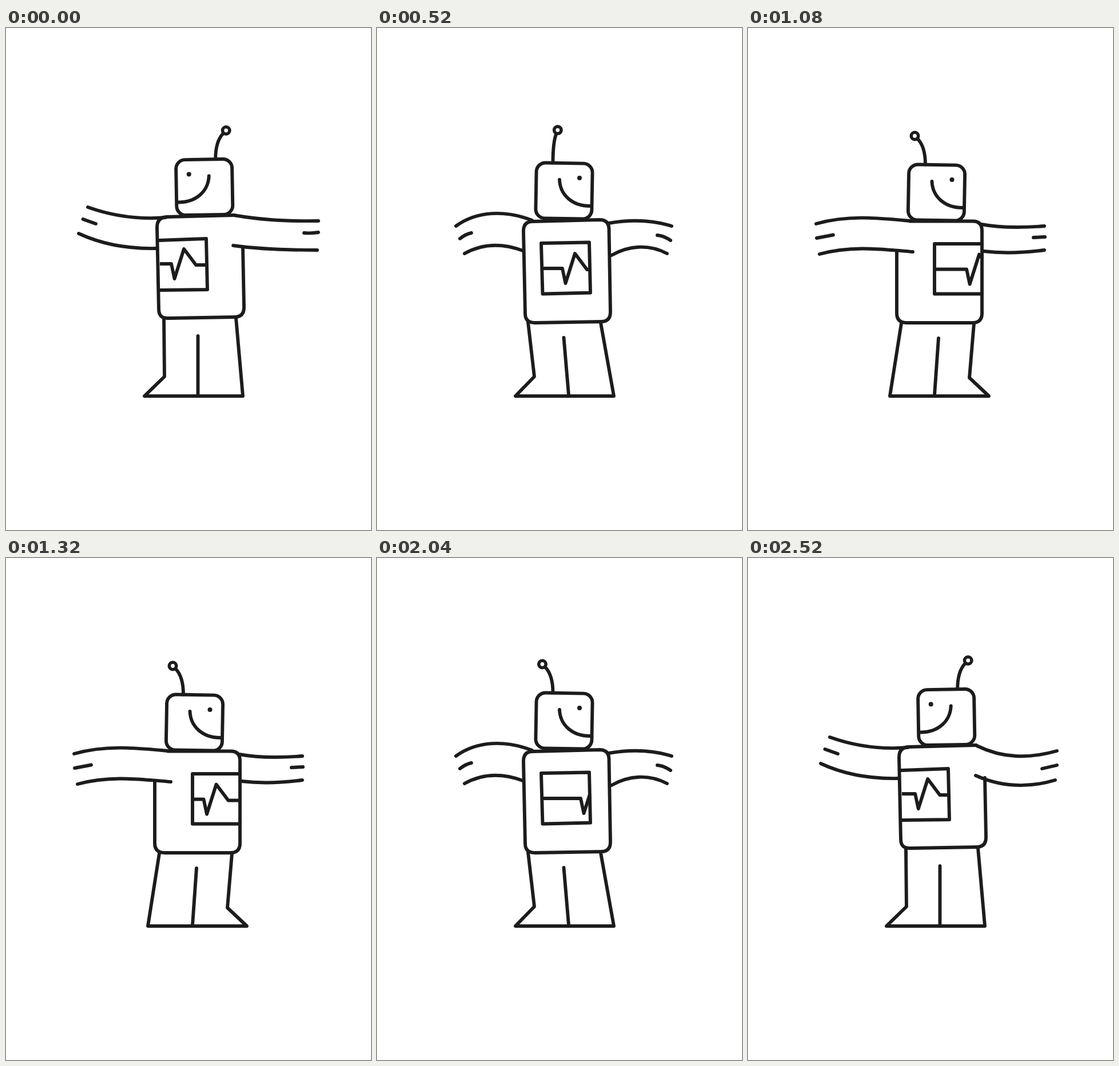
Recreate the animation shown at these times as an HTML page. Size 638 px wide and 877 px high, loop 2560 ms.

```html
<!DOCTYPE html>
<html lang="en">
<head>
<meta charset="utf-8">
<title>Dancing robot</title>
<style>
html, body { margin: 0; width: 100%; height: 100%; overflow: hidden; background: #fff; }
svg { display: block; width: 100%; height: 100%; }
.ink { fill: none; stroke: #1c1c1c; stroke-width: 5.9; stroke-linecap: round; stroke-linejoin: round; }
</style>
</head>
<body>
<svg viewBox="0 0 638 877">
  <defs><clipPath id="window"><rect id="pane" y="340" height="160"/></clipPath></defs>
  <g class="ink">
    <path id="legs"/>
    <path id="body"/>
    <path id="arms"/>
    <path id="panel"/>
    <path id="pulse" clip-path="url(#window)"/>
    <g id="head">
      <rect x="-49" y="-48.5" width="98" height="97" rx="16" transform="rotate(1)"/>
      <path d="M-8 -19.5C-7 6 13 27 47 26.5"/>
      <circle cx="27" cy="-22.5" r="4" fill="#1c1c1c" stroke="none"/>
    </g>
    <path id="stalk"/>
    <circle id="tip" r="6.2" stroke-width="5.6"/>
  </g>
</svg>
<script>
const LOOP = 2560, STEP = 40;
const el = id => document.getElementById(id);
const set = (id, attrs) => {
  for (const k in attrs) el(id).setAttribute(k, attrs[k]);
};

// Views of the torso, legs and head
const left = {
  head: [346.7, 278], face: -1, screen: [269, 412, 82],
  body: 'M414 384L416 488Q416 505 399 505L284 507Q267 508 267 491L264 348Q264 331 281 330L399 327',
  legs: 'M276 509L277 609L242 643H414L402 507M335.5 538V641',
  panel: 'M268 371L350 368L352 457L268 458'
};
const front = {
  head: [327, 284.5], face: 1, screen: [288, 420, 84],
  body: 'M272 338L389 335Q405 335 405.500 351L408 496Q408 513 392 513L276 515Q259 515 259 499L256 355Q256 338 272 338',
  legs: 'M264 514L275 609L242 643H414L391 515M326.500 541L335 641',
  panel: 'M287 376L371 374.500L373 462.500L289.500 464.500Z'
};
const right = {
  head: [328, 285.5], face: 1, screen: [324, 420.5, 83],
  body: 'M258 394L258 495Q258 512 275 512.500L391 513Q407 513 407 496V352Q407 335.500 391 335.500H272',
  legs: 'M266 513L252 643H409L389.500 611L393 513M332.500 541L330 641',
  panel: 'M407 375H324V462.500H407'
};
const farRight = {
  head: [329.5, 287.5], face: 1, screen: [326, 421.5, 83],
  body: 'M260 391V498Q260 515 277 515H393Q409 515 409 498V354Q409 337.500 393 337.500H283',
  legs: 'M268 516L248 643H421L387 611L395 516M333 542L326 641',
  panel: 'M409 377H326V464.500H409'
};

// Arm drawings: upper line, lower line, finger
const leftRaised = 'M279 331C230 335 185 328 143 313M263 385C215 386 170 379 127 359M134.500 334L157 342';
const arms = {
  leftFlat: leftRaised + 'M398 327C440 334 480 338 546 337M397 380C440 386 490 388 544 388M521 358Q533 359 546 357',
  leftSag: leftRaised + 'M400 328C445 350 490 351 540 337M398 380C445 401 490 402 537 388M514 368L540 362',
  leftLift: leftRaised + 'M400 328C440 356 485 352 533 322M398 380C445 408 490 404 533 372M510 357L531 347',
  frontFlat: 'M271 336C225 332 175 328 122 343M255 389C215 385 175 382 127 396M124 368L151 363' +
    'M405 341C445 347 490 347 534 343M410 393C445 396 490 394 533 390M510 367L532 365',
  frontDown: 'M271 336C225 318 175 319 138 346M255 389C220 376 185 376 153 394M145 368Q155 360 165 358' +
    'M405 341C440 335 480 335 515 346M410 397C440 380 475 377 507 394M490 362Q501 363 513 371',
  up: 'M272 335C240 347 205 348 167 328M271 390C220 402 185 400 149 377M157 351Q165 357 174 360' +
    'M408 347C440 355 475 355 509 346M409 394C445 402 480 400 516 387M495 371Q506 369 514 366',
  flat: 'M283 337C230 332 175 326 119 342M288 391C230 386 180 380 125 395M120 367L149 361.500' +
    'M408 343C440 349 480 349 518 346M412 390C445 394 480 393 518 388M499 366L519 365'
};

const poses = [
  [0, left, 'leftFlat'],
  [320, front, 'frontFlat'],
  [480, front, 'frontDown'],
  [640, right, 'up'],
  [960, farRight, 'flat'],
  [1600, right, 'up'],
  [1920, front, 'frontDown'],
  [2080, front, 'frontFlat'],
  [2240, left, 'leftLift'],
  [2400, left, 'leftSag']
];

// Antenna bend over time: -1 leans left, 1 leans right
const bends = [[0, 1], [320, 1], [480, 0.5], [520, 0.45], [560, -0.66], [640, -1],
  [2080, -1], [2200, 0], [2240, 0.88], [2320, 0.75], [2400, 1], [LOOP, 1]];

function bendAt(t) {
  const i = bends.findIndex(k => k[0] > t);
  const [t0, a] = bends[i - 1], [t1, b] = bends[i];
  return a + (b - a) * (t - t0) / (t1 - t0);
}

function pulseAt(t) {
  const n = t / STEP;
  if (t < 320) return 20 - 3.75 * n;
  if (t < 640) return 36 - 6.1 * (n - 13);
  if (t < 1880) return 19.5 - 6.1 * (n - 33);
  return 68 - 3.73 * (n - 51);
}

function drawAntenna([hx, hy], face, bend) {
  const x = hx - 19.5 * face, y = hy - 49;
  const dx = 18.5 * bend, dy = -59 + 9 * bend * bend;
  const cx = dx * 0.26, cy = dy * 0.72;
  const len = Math.hypot(dx - cx, dy - cy);
  const ex = dx - (dx - cx) / len * 7, ey = dy - (dy - cy) / len * 7;
  set('stalk', { d: `M${x} ${y}C${x} ${y - 21} ${x + cx} ${y + cy} ${x + ex} ${y + ey}` });
  set('tip', { cx: x + dx, cy: y + dy });
}

function drawPulse([x, y, w], p) {
  const s = x + p;
  const end = Math.max(x + w, s + 42);
  const start = Math.min(x, s);
  set('pane', { x, width: w });
  set('pulse', { d: `M${start} ${y}H${s}L${s + 5.5} ${y + 26}L${s + 22} ${y - 26}L${s + 43} ${y + 2}H${end + 2}` });
}

function draw(time) {
  const t = Math.floor(time % LOOP / STEP) * STEP;
  const [, view, arm] = poses.filter(p => p[0] <= t).pop();
  for (const part of ['body', 'legs', 'panel']) set(part, { d: view[part] });
  set('arms', { d: arms[arm] });
  set('head', { transform: `translate(${view.head}) scale(${view.face} 1)` });
  drawAntenna(view.head, view.face, bendAt(t));
  drawPulse(view.screen, pulseAt(t));
}

let begin;
function tick(now) {
  if (begin === undefined) begin = now;
  draw(now - begin);
  requestAnimationFrame(tick);
}
draw(0);
requestAnimationFrame(tick);
</script>
</body>
</html>
```
